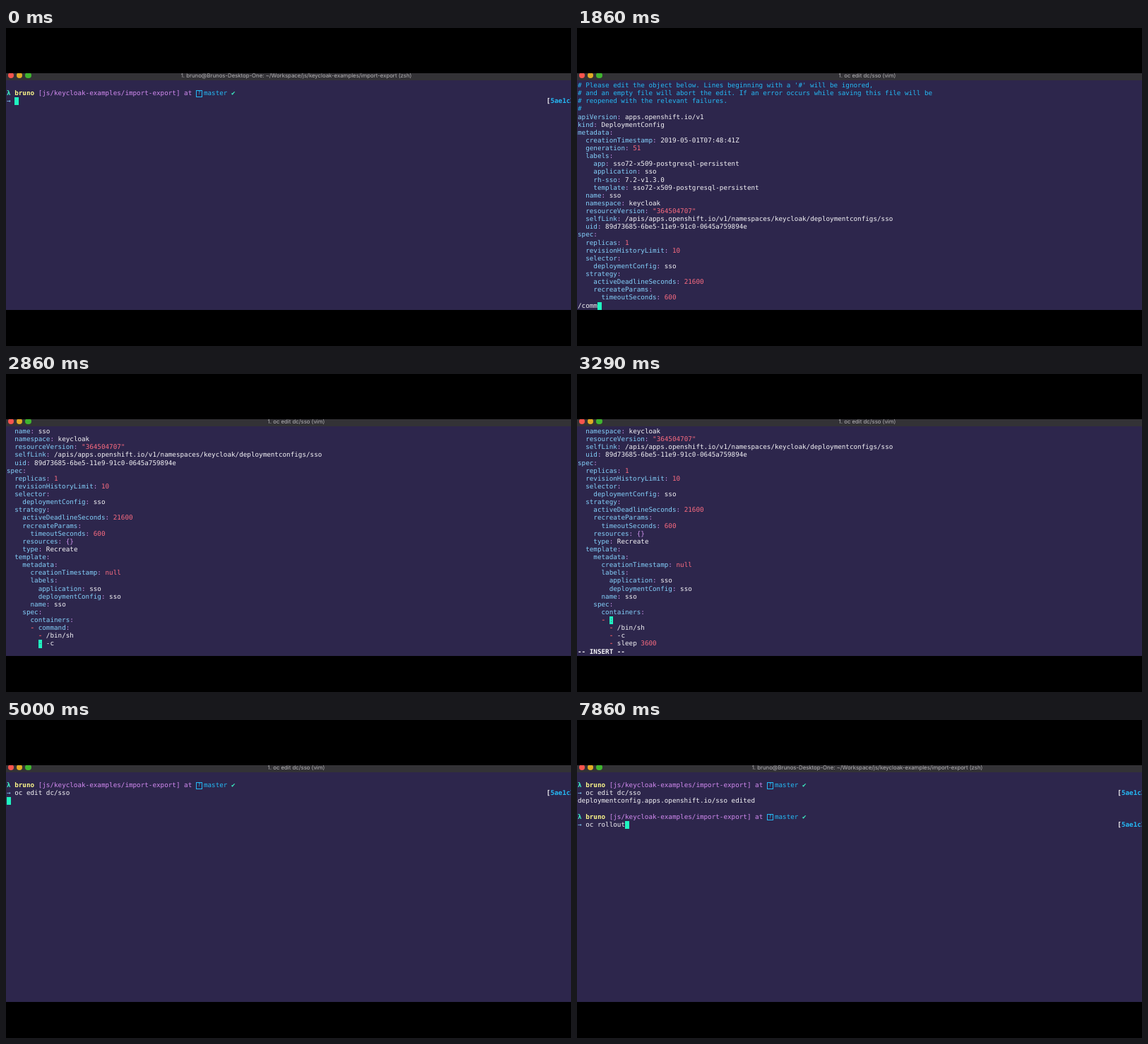
These frames come from a looping animation (800x450 px, 8000 ms). An HTML page:

```html
<!DOCTYPE html>
<html lang="en">
<head>
<meta charset="utf-8">
<title>Terminal session</title>
<style>
  html, body { margin: 0; width: 100%; height: 100%; overflow: hidden; background: #000; }
  #win { position: absolute; left: 0; top: 64px; width: 800px; height: 335px; overflow: hidden; background: #2d264c; }
  #bar { position: absolute; width: 800px; height: 10px; overflow: hidden; background: #333236; }
  #bar b { position: absolute; top: -1.3px; width: 8.6px; height: 8.6px; border-radius: 50%; }
  #title { position: absolute; left: 11px; top: -2.5px; width: 800px; text-align: center; white-space: pre;
    font: 7.8px/11px Inter, "Open Sans", sans-serif; color: #b4b3b6; text-rendering: geometricPrecision; }
  #screen, #cursor { position: absolute; margin: 0; white-space: pre; color: #f4f3f6;
    font: 9.277px/11.14px "DejaVu Sans Mono", monospace; text-rendering: geometricPrecision; font-variant-ligatures: none; }
  #screen { left: 1px; top: 12.1px; }
  #screen div { position: relative; height: 11.14px; }
  #cursor { width: 5.8px; height: 11.14px; background: #1ff5c0; color: #46708f; }
  .teal { color: #3df2c4; }
  .user { color: #fbf58a; font-weight: bold; }
  .path { color: #d28af0; }
  .git { color: #25b9f4; }
  .key { color: #84d0fb; }
  .punct { color: #cf94ee; }
  .num { color: #fb6c80; }
  .dash { color: #c0505f; font-weight: bold; }
  .bold { font-weight: bold; }
  .hash { position: absolute; left: 764.3px; font-weight: bold; }
  .box { display: inline-block; box-sizing: border-box; width: 9.5px; height: 9.5px; margin: 1px 1.67px 0 0;
    border: 1px solid; vertical-align: top; font: 7px/7.5px "DejaVu Sans Mono", monospace; text-align: center; }
</style>
</head>
<body>
<div id="win">
  <div id="bar">
    <b style="left:2.7px;background:#f9544d"></b>
    <b style="left:14.7px;background:#e0aa25"></b>
    <b style="left:27.2px;background:#3fb52f"></b>
    <div id="title"></div>
  </div>
  <div id="screen"></div>
  <div id="cursor"></div>
</div>
<script>
const CELL = 5.585, ROW = 11.14, TICKS = 56, LOOP = 8000;
const SHELL = '1. bruno@Brunos-Desktop-One: ~/Workspace/js/keycloak-examples/import-export (zsh)';
const EDITOR = '1. oc edit dc/sso (vim)';
const EDIT = 'oc edit dc/sso';
const KEY_LINE = 39;

const FILE = `# Please edit the object below. Lines beginning with a '#' will be ignored,
# and an empty file will abort the edit. If an error occurs while saving this file will be
# reopened with the relevant failures.
#
apiVersion: apps.openshift.io/v1
kind: DeploymentConfig
metadata:
  creationTimestamp: 2019-05-01T07:48:41Z
  generation: 51
  labels:
    app: sso72-x509-postgresql-persistent
    application: sso
    rh-sso: 7.2-v1.3.0
    template: sso72-x509-postgresql-persistent
  name: sso
  namespace: keycloak
  resourceVersion: "364504707"
  selfLink: /apis/apps.openshift.io/v1/namespaces/keycloak/deploymentconfigs/sso
  uid: 89d73685-6be5-11e9-91c0-0645a759894e
spec:
  replicas: 1
  revisionHistoryLimit: 10
  selector:
    deploymentConfig: sso
  strategy:
    activeDeadlineSeconds: 21600
    recreateParams:
      timeoutSeconds: 600
    resources: {}
    type: Recreate
  template:
    metadata:
      creationTimestamp: null
      labels:
        application: sso
        deploymentConfig: sso
      name: sso
    spec:
      containers:
      - command:
        - /bin/sh
        - -c
        - sleep 3600`.split('\n');

const span = (cls, text) => text ? `<span class="${cls}">${text}</span>` : '';

function yaml(line) {
  if (line[0] === '#') return span('git', line);
  const [, indent, dash, key, colon, value] = line.match(/^( *)(- )?(?:([\w-]*)(:))?(.*)$/);
  return indent + span('dash', dash) + span('key', key) + span('punct', colon) +
    value.replace(/(^|\s)(\d+|null|".*")$/, (m, gap, v) => gap + span('num', v))
         .replace('{}', span('punct', '{}'));
}

const header = span('teal bold', 'λ ') + span('user', 'bruno ') +
  span('path', '[js/keycloak-examples/import-export] at ') +
  span('git', '<span class="box">?</span>master ') + span('teal', '✔');
const prompt = text => ['', header,
  span('key', '→ ') + text + `<span class="hash">[${span('git', '5ae1c3')}</span>`];

const typing = text => ({ title: SHELL, rows: prompt(text), r: 2, c: 2 + text.length });
const waiting = { title: EDITOR, rows: prompt(EDIT), r: 3, c: 0 };
const edited = [...prompt(EDIT), 'deploymentconfig.apps.openshift.io/sso edited'];
const typingNext = text => ({ title: SHELL, rows: [...edited, ...prompt(text)], r: 6, c: 2 + text.length });

function vim(top, r, c, status = '', key = 'command') {
  const lines = FILE.map((l, i) => i === KEY_LINE ? l.replace('command', key) : l).slice(top, top + 28);
  return { title: EDITOR, rows: [...lines.map(yaml), status], r, c, under: (lines[r] || '')[c] };
}
const search = text => vim(0, 28, text.length, text);
const insert = key => vim(15, 24, 8 + key.length, span('bold', '-- INSERT --'), key);
const command = text => vim(15, 28, text.length, text, 'args');

// [tick, state]; one tick is a seventh of a second
const steps = [
  [0, typing('')],
  ...[[1, 2], [2, 4], [3, 6], [4, 8], [6, 9], [7, 11], [8, 14]].map(([k, n]) => [k, typing(EDIT.slice(0, n))]),
  [9, waiting],
  [10, vim(0, 0, 0)],
  ...[[11, 1], [12, 3], [13, 5], [14, 6], [15, 8]].map(([k, n]) => [k, search('/command'.slice(0, n))]),
  [16, vim(12, 27, 8, '/command')],
  [18, vim(12, 27, 8)],
  [19, vim(13, 27, 8)],
  [20, vim(14, 27, 8)],
  [21, vim(15, 27, 8)],
  [22, vim(15, 24, 8)],
  ...[0, 1, 2, 3, 4].map(n => [23 + n, insert('args'.slice(0, n))]),
  [28, vim(15, 24, 11, '', 'args')],
  [29, command(':')],
  [30, command(':w')],
  [32, command(':wq')],
  [34, waiting],
  [38, { title: EDITOR, rows: edited, r: 4, c: 0 }],
  [39, typingNext('')],
  ...[[43, 1], [44, 2], [45, 3], [46, 4], [47, 5], [48, 6], [49, 7], [54, 9], [55, 10]]
    .map(([k, n]) => [k, typingNext('oc rollout'.slice(0, n))]),
];

const [title, screen, cursor] = ['title', 'screen', 'cursor'].map(id => document.getElementById(id));
let shown;

function draw() {
  // the small margin absorbs times rounded down to 10 ms
  const tick = performance.now() % LOOP / LOOP * TICKS + 0.05;
  const state = steps.findLast(([k]) => k <= tick)[1];
  if (state !== shown) {
    shown = state;
    title.textContent = state.title;
    screen.innerHTML = state.rows.map(row => `<div>${row}</div>`).join('');
    cursor.textContent = state.under || '';
    cursor.style.left = 1 + state.c * CELL + 'px';
    cursor.style.top = 11.7 + state.r * ROW + 'px';
  }
  requestAnimationFrame(draw);
}
draw();
</script>
</body>
</html>
```
